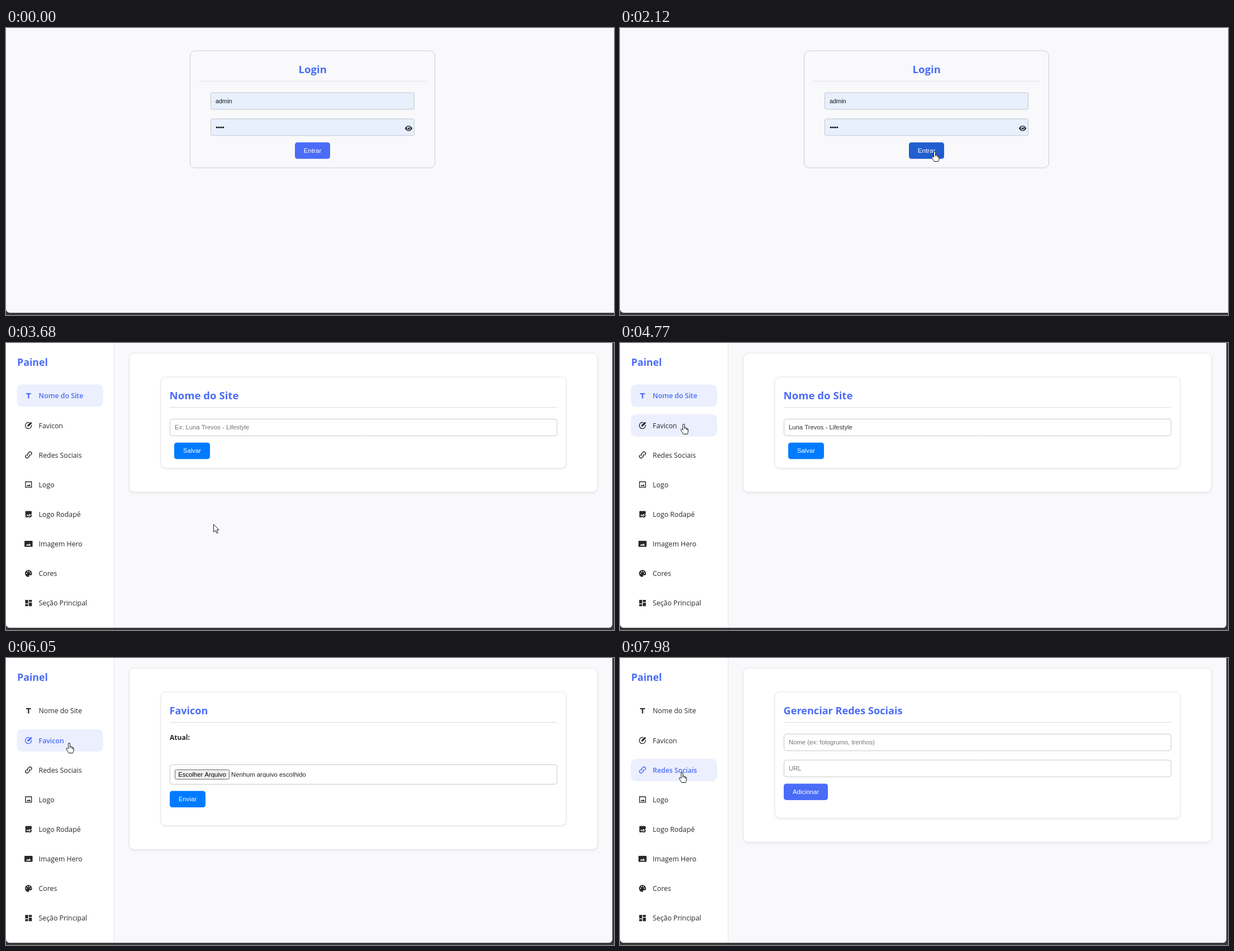
Animation of 1088 by 515 pixels, one loop 8000 ms. Source, as an HTML page with a canvas:

```html
<!DOCTYPE html>
<html lang="pt-BR">
<head>
<meta charset="utf-8">
<title>Painel</title>
<style>
  html, body { margin: 0; width: 100%; height: 100%; overflow: hidden; background: #f9f9fc; }
  canvas { display: block; width: 1088px; height: 515px; }
</style>
</head>
<body>
<canvas id="stage" width="1088" height="515"></canvas>
<script>
const ctx = document.getElementById('stage').getContext('2d');
const LOOP = 8000;
const UI = '"Open Sans", "Noto Sans", sans-serif';
const FORM = '"Liberation Sans", Arial, sans-serif';
const BLUE = [74, 108, 247], INK = [38, 40, 44], DEEP = [32, 94, 208];
const SITE = 'Luna Trevos - Lifestyle';

// When each state begins, in ms
const AT = {
  buttonHover: 1830, panel: 2200, icons: 3680, value: 3810,
  faviconHover: 4360, favicon: 5300, current: 5710, badge: 6110,
  socialHover: 6440, social: 7720
};

// Pointer moves: start, end, steps, then start, control and end point
const MOVES = [
  [310, 460, 3, [1129, 560], [990, 431], [850, 303], true],
  [1250, 2050, 13, [850, 303], [790, 400], [563, 221]],
  [3070, 3480, 7, [563, 221], [467, 273], [371, 325]],
  [3810, 4420, 9, [371, 325], [495, 215], [124, 140]],
  [4490, 4770, 5, [124, 140], [118, 141], [114, 145]],
  [4840, 5170, 6, [114, 145], [114, 149], [113, 152]],
  [6110, 6770, 10, [113, 152], [114, 180], [111, 205]]
];

const MENU = ['Nome do Site', 'Favicon', 'Redes Sociais', 'Logo', 'Logo Rodapé',
  'Imagem Hero', 'Cores', 'Seção Principal'];

const dot = (x, y) => `M${x - 1.6} ${y}a1.6 1.6 0 1 0 3.2 0a1.6 1.6 0 1 0-3.2 0z`;
// Icons on a 24 unit grid: filled path, stroked path
const ICONS = [
  ['M5 4.5h14v3.3h-5.2v12h-3.6v-12H5z'],
  ['M9 15v-3.5L18.5 2 22 5.5 12.5 15z', 'M14 4A8.8 8.8 0 1 0 20.3 10.5'],
  ['', 'M10 14a4.5 4.5 0 0 1 0-6.3l3.6-3.6a4.5 4.5 0 0 1 6.3 6.3l-2 2' +
    'M14 10a4.5 4.5 0 0 1 0 6.3l-3.6 3.6a4.5 4.5 0 0 1-6.3-6.3l2-2'],
  ['M6.5 16.5l3-4 2 2.5 3-4 4 5.5z', 'M3.5 4h17v16h-17z'],
  ['M5 3h14a2 2 0 0 1 2 2v6l-8.5 8.5V21H5a2 2 0 0 1-2-2V5a2 2 0 0 1 2-2z' +
    'M5.5 17l3.5-4.5 2.5 3 3.5-4.5 2 3-4 3z' + 'M14 22v-2.5l6-6 2.5 2.5-6 6z'],
  ['M2 3.5h20q1.5 0 1.5 1.5v14q0 1.5-1.5 1.5H2Q.5 20.5.5 19V5Q.5 3.5 2 3.5z' +
    'M5 17h14l-4.5-6-3.5 4.5-2.5-3z'],
  ['M12 2a10 10 0 0 0 0 20c1.7 0 2-1.2 1.4-2.4-.7-1.4 0-2.6 1.6-2.6h3a4 4 0 0 0 4-4c0-6-4.5-11-10-11z' +
    dot(6.5, 11.5) + dot(9.5, 7) + dot(14.5, 7) + dot(17.5, 11.5)],
  ['M2.5 3H11v10H2.5zM13 3h8.5v6H13zM2.5 15H11v6H2.5zM13 11h8.5v10H13z']
].map(paths => paths.map(d => new Path2D(d)));

const ARROW = new Path2D('M.5.5V14l3.1-2.8 2.3 5 2.3-1-2.2-4.9h4z');
const HAND = new Path2D('M-1.5 11V2Q-1.5.5 0 .5T1.6 2V7Q4 5.8 4.4 8 6.2 7 6.6 9 8 8.3 8 10.3V13' +
  'Q8 15.5 6.5 18.5H-.8Q-1.5 16.5-3.4 14.2L-5 11.3Q-5.3 9.5-3.7 9.6-2.7 10-1.5 11z');

const clamp = v => Math.max(0, Math.min(1, v));
const fade = (t, start, length = 260) => clamp((t - start) / length);
const rgb = c => `rgb(${c.map(Math.round)})`;
const mix = (a, b, k) => rgb(a.map((v, i) => v + (b[i] - v) * k));

function box(x, y, w, h, r, fill, line) {
  ctx.beginPath();
  ctx.roundRect(x, y, w, h, r);
  if (fill) { ctx.fillStyle = fill; ctx.fill(); }
  if (line) { ctx.strokeStyle = line; ctx.lineWidth = 1; ctx.stroke(); }
}

function text(s, x, y, size, color, { font = FORM, weight = 400, align = 'left' } = {}) {
  ctx.font = `${weight} ${size}px ${font}`;
  ctx.textAlign = align;
  ctx.fillStyle = color;
  ctx.fillText(s, x, y);
}

function circle(x, y, r, color) {
  ctx.beginPath();
  ctx.arc(x, y, r, 0, Math.PI * 2);
  ctx.fillStyle = color;
  ctx.fill();
}

function rule(x, y, w) {
  ctx.fillStyle = '#dcdcdf';
  ctx.fillRect(x, y, w, 1);
}

function button(label, x, y, w, color, size = 11.3) {
  box(x, y, w, 29.5, 4.5, color);
  text(label, x + w / 2, y + 18.6, size, '#fff', { align: 'center' });
}

function field(y, content, color, h = 30) {
  box(293.5, y + .5, 692.5, h, 4, '#fff', '#c8c8ca');
  text(content, 302, y + 19.3, 11.3, color);
}

function fileForm(y) {
  field(y, '', '#333', 35);
  box(302.5, y + 9.5, 97, 17, 2, '#efefef', '#6c6c6c');
  text('Escolher Arquivo', 351, y + 22, 11.3, '#000', { align: 'center' });
  text('Nenhum arquivo escolhido', 403, y + 22, 11.3, '#222');
  button('Enviar', 293, y + 47.5, 64, '#007bff');
}

function pointerAt(t) {
  let spot = null;
  for (const [from, to, steps, a, c, b, linear] of MOVES) {
    if (t < from) break;
    const step = Math.floor((t - from) / (to - from) * (steps - 1) + 1e-6) + 1;
    const p = clamp(step / steps);
    const k = linear ? p : p * p * (3 - 2 * p);
    spot = a.map((v, i) => (1 - k) ** 2 * v + 2 * k * (1 - k) * c[i] + k * k * b[i]);
  }
  return spot;
}

function drawPointer(t) {
  const spot = pointerAt(t);
  if (!spot) return;
  const [x, y] = spot.map(Math.round);
  const link = t < AT.panel
    ? x >= 517 && x < 580 && y >= 205 && y < 235
    : x >= 19 && x < 174 && y > 74;
  ctx.save();
  ctx.translate(x, y);
  ctx.lineWidth = 1;
  ctx.lineJoin = 'round';
  ctx.fillStyle = '#fff';
  ctx.strokeStyle = '#16161e';
  const shape = link ? HAND : ARROW;
  ctx.fill(shape);
  ctx.stroke(shape);
  if (link) {
    ctx.beginPath();
    for (const [fx, fy] of [[1.6, 7], [4.4, 8], [6.5, 9]]) {
      ctx.moveTo(fx, fy);
      ctx.lineTo(fx, fy + 2.5);
    }
    ctx.stroke();
  }
  ctx.restore();
}

function drawEye() {
  ctx.beginPath();
  ctx.moveTo(713.8, 180);
  ctx.bezierCurveTo(717, 173.5, 724, 173.5, 727.2, 180);
  ctx.bezierCurveTo(724, 186.5, 717, 186.5, 713.8, 180);
  ctx.fillStyle = '#212529';
  ctx.fill();
  circle(720.5, 180, 3.4, '#e8f0fe');
  circle(720.5, 180, 2.3, '#212529');
  circle(719.6, 179, .9, '#e8f0fe');
}

function drawLogin(t) {
  box(329.5, 41, 438, 210, 9, null, '#cbcbce');
  text('Login', 548.7, 81, 18.6, rgb(BLUE), { font: UI, weight: 700, align: 'center' });
  rule(346, 95, 405);
  for (const y of [116, 163]) box(366.5, y, 364, 30, 3, '#e8f0fe', '#c2c5cb');
  text('admin', 375, 135.3, 10.9, '#111');
  for (let i = 0; i < 4; i++) circle(377.3 + i * 3.8, 178.3, 1.6, '#111');
  drawEye();
  button('Entrar', 517, 205.3, 63, mix(BLUE, DEEP, fade(t, AT.buttonHover, 220)), 11.6);
}

function drawIcon([fill, line], y, color) {
  ctx.save();
  ctx.translate(40.3 - 12 * .63, y - 12 * .63);
  ctx.scale(.63, .63);
  ctx.fillStyle = ctx.strokeStyle = color;
  ctx.lineWidth = 2.2;
  ctx.fill(fill, 'evenodd');
  if (line) ctx.stroke(line);
  ctx.restore();
}

function drawMenu(t) {
  ctx.fillStyle = '#fff';
  ctx.fillRect(0, 0, 193, 511);
  ctx.fillStyle = '#e4e5ea';
  ctx.fillRect(193, 0, 1, 511);
  text('Painel', 20, 41, 17.8, rgb(BLUE), { font: UI, weight: 700 });

  const toFavicon = fade(t, AT.favicon), toSocial = fade(t, AT.social);
  const active = [1 - toFavicon, toFavicon * (1 - toSocial), toSocial];
  const hover = [0, fade(t, AT.faviconHover) * (1 - toSocial), fade(t, AT.socialHover)];
  const chosen = t < AT.favicon ? 0 : t < AT.social ? 1 : 2;

  MENU.forEach((label, i) => {
    const y = 94.6 + i * 53.15;
    const on = active[i] || 0;
    const color = mix(INK, BLUE, on);
    ctx.globalAlpha = Math.max(on, hover[i] || 0);
    if (ctx.globalAlpha) box(19.3, y - 20, 154.4, 40, 9, '#ebeffe');
    ctx.globalAlpha = 1;
    if (t >= AT.icons) drawIcon(ICONS[i], y, color);
    text(label, 58.6, y + 4.8, 12.3, color, { font: UI, weight: i === chosen ? 600 : 400 });
  });
}

function card(x, y, w, h) {
  ctx.save();
  ctx.shadowColor = 'rgba(0,0,0,.07)';
  ctx.shadowBlur = 5;
  ctx.shadowOffsetY = 2;
  box(x, y, w, h, 9, '#fff');
  ctx.restore();
  box(x, y, w, h, 9, null, '#e3e4e8');
}

function drawFrame(title, size, bottom) {
  card(220.5, 18, 838, bottom + 43 - 18);
  card(277, 61, 725.5, bottom - 61);
  text(title, 292.6, 101, size, rgb(BLUE), { font: UI, weight: 700 });
  rule(293, 115, 693);
}

function drawContent(t) {
  if (t < AT.favicon) {
    drawFrame('Nome do Site', 18.6, 224.5);
    if (t < AT.value) field(136, 'Ex: ' + SITE, '#757575');
    else field(136, SITE, '#333');
    button('Salvar', 301, 178.7, 64, '#007bff');
  } else if (t < AT.social) {
    const loaded = t >= AT.current;
    drawFrame('Favicon', 18, loaded ? 300.5 : 245.5);
    if (loaded) text('Atual:', 293, 147, 12.1, rgb(INK), { font: UI, weight: 700 });
    if (t >= AT.badge) circle(299.6, 161.6, 6.5, '#a740f0');
    fileForm(loaded ? 191 : 136);
  } else {
    drawFrame('Gerenciar Redes Sociais', 18.1, 287.5);
    field(136, 'Nome (ex: fotogrumo, trenhos)', '#757575');
    field(182.7, 'URL', '#757575');
    button('Adicionar', 293, 225.4, 79, rgb(BLUE));
  }
}

function draw(t) {
  const inPanel = t >= AT.panel;
  ctx.fillStyle = '#38383a';
  ctx.fillRect(0, 0, 1088, 515);
  ctx.save();
  ctx.beginPath();
  ctx.roundRect(0, 0, inPanel ? 1085 : 1088, 511, [0, 0, inPanel ? 6 : 0, 7]);
  ctx.clip();
  ctx.fillStyle = '#f9f9fc';
  ctx.fillRect(0, 0, 1088, 511);
  if (inPanel) {
    drawMenu(t);
    drawContent(t);
  } else {
    drawLogin(t);
  }
  ctx.restore();
  drawPointer(t);
}

const start = performance.now();
function tick() {
  draw((performance.now() - start) % LOOP);
  requestAnimationFrame(tick);
}
tick();
</script>
</body>
</html>
```
